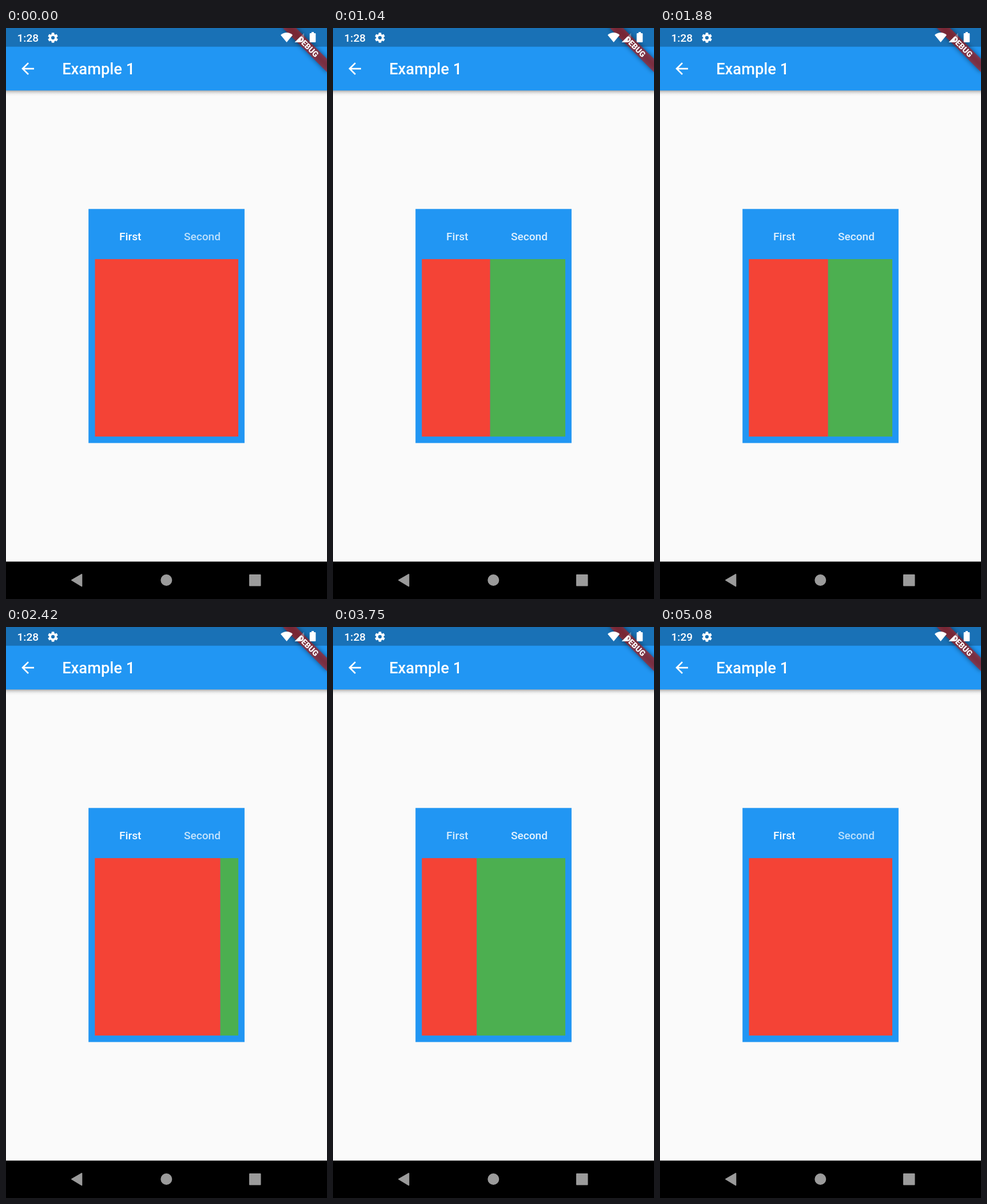
Recreate the animation shown at these times as an HTML page. Size 561 by 998 pixels, loop 5120 ms.

```html
<!DOCTYPE html>
<html lang="en">
<head>
<meta charset="utf-8">
<title>Tab swipe</title>
<style>
  html, body { margin: 0; width: 100%; height: 100%; overflow: hidden; background: #fafafa; }
  svg { display: block; width: 100%; height: 100%; }
  text { font-family: Roboto, "Noto Sans", sans-serif; font-weight: 500; fill: #fff; }
  .tab { font-size: 19.1px; text-anchor: middle; }
</style>
</head>
<body>
<svg viewBox="0 0 561 998">
  <defs>
    <linearGradient id="barShadow" x2="0" y2="1">
      <stop offset="0" stop-opacity=".32"/>
      <stop offset=".3" stop-opacity=".15"/>
      <stop offset=".65" stop-opacity=".04"/>
      <stop offset="1" stop-opacity="0"/>
    </linearGradient>
    <filter id="blur" x="-20%" y="-100%" width="140%" height="300%">
      <feGaussianBlur stdDeviation="4"/>
    </filter>
    <clipPath id="pageClip"><rect x="155.3" y="403.8" width="250.7" height="310.5"/></clipPath>
  </defs>

  <rect width="561" height="998" fill="#fafafa"/>
  <rect y="109" width="561" height="10" fill="url(#barShadow)"/>
  <rect width="561" height="109.2" fill="#2196f3"/>
  <rect width="561" height="32.7" fill-opacity=".25"/>
  <path transform="translate(21.7 54.7) scale(1.364)" fill="#fff"
    d="M20 11H7.83l5.59-5.59L12 4l-8 8 8 8 1.41-1.41L7.83 13H20z"/>
  <text x="98.2" y="81" font-size="27.3">Example 1</text>

  <rect x="144.2" y="316.3" width="272.7" height="409.1" fill="#2196f3"/>
  <text id="first" class="tab" x="217.2" y="370.5">First</text>
  <text id="second" class="tab" x="343" y="370.5">Second</text>
  <g clip-path="url(#pageClip)">
    <g id="pages">
      <rect x="155.3" y="403.8" width="250.7" height="310.5" fill="#f44336"/>
      <rect x="406" y="403.8" width="250.7" height="310.5" fill="#4caf50"/>
    </g>
  </g>

  <!-- debug ribbon -->
  <g transform="translate(561 0) rotate(45)">
    <rect x="-54.6" y="38.2" width="109.2" height="16.4" fill-opacity=".5" filter="url(#blur)"/>
    <rect x="-54.6" y="38.2" width="109.2" height="16.4" fill="#b71c1c" fill-opacity=".627"/>
    <text y="51.4" font-size="13.9" text-anchor="middle" style="font-weight:900">DEBUG</text>
  </g>

  <!-- status bar -->
  <text id="clock" x="19.5" y="24" font-size="19.1">1:28</text>
  <g fill="#fff">
    <path transform="translate(71.4 6.4) scale(.885)" d="M19.43 12.98c.04-.32.07-.64.07-.98s-.03-.66-.07-.98l2.11-1.65c.19-.15.24-.42.12-.64l-2-3.46c-.12-.22-.39-.3-.61-.22l-2.49 1c-.52-.4-1.08-.73-1.69-.98l-.38-2.65C14.46 2.18 14.25 2 14 2h-4c-.25 0-.46.18-.49.42l-.38 2.65c-.61.25-1.17.59-1.69.98l-2.49-1c-.23-.09-.49 0-.61.22l-2 3.46c-.13.22-.07.49.12.64l2.11 1.65c-.04.32-.07.65-.07.98s.03.66.07.98l-2.11 1.65c-.19.15-.24.42-.12.64l2 3.46c.12.22.39.3.61.22l2.49-1c.52.4 1.08.73 1.69.98l.38 2.65c.03.24.24.42.49.42h4c.25 0 .46-.18.49-.42l.38-2.65c.61-.25 1.17-.59 1.69-.98l2.49 1c.23.09.49 0 .61-.22l2-3.46c.12-.22.07-.49-.12-.64l-2.11-1.65zM12 15.5a3.5 3.5 0 1 1 0-7 3.5 3.5 0 0 1 0 7z"/>
    <path d="M480 12.2Q490.5 4 501 12.2L490.5 25z"/>
    <path d="M504.5 25L521 8.5V25z" fill-opacity=".3"/>
    <path d="M504.5 25L515 14.5V25z"/>
    <path d="M534 7h4v2h2q1.300 0 1.300 1.300V23.700q0 1.300-1.300 1.300h-8q-1.300 0-1.300-1.300V10.300q0-1.300 1.300-1.300h2z"/>
  </g>

  <!-- navigation bar -->
  <rect y="932.6" width="561" height="65.4"/>
  <g fill="#9b9b9b" stroke="#9b9b9b" stroke-linejoin="round" stroke-width="2">
    <path d="M115 965L132.300 955V975.500z"/>
    <circle cx="280.300" cy="965" r="9"/>
    <rect x="426" y="956" width="18.500" height="18.500"/>
  </g>
</svg>
<script>
  const LOOP = 5120, PAGE = 250.7, CLOCK_TICK = 4400;
  // Each swipe moves the pages by one step, alternately forward and back.
  const swipes = [
    { start: 680, length: 700, step: 1 },
    { start: 1560, length: 600, step: -1 },
    { start: 2242, length: 810, step: 1 },
    { start: 3456, length: 700, step: -1 }
  ];
  const [pages, first, second, clock] =
    ["pages", "first", "second", "clock"].map(id => document.getElementById(id));

  const ease = x => {
    const p = Math.min(1, Math.max(0, x));
    return p * p * (3 - 2 * p);
  };

  function draw(t) {
    const offset = swipes.reduce((sum, s) => sum + s.step * ease((t - s.start) / s.length), 0);
    pages.setAttribute("transform", `translate(${-PAGE * offset} 0)`);
    first.setAttribute("fill-opacity", 1 - 0.3 * offset);
    second.setAttribute("fill-opacity", 0.7 + 0.3 * offset);
    clock.textContent = t < CLOCK_TICK ? "1:28" : "1:29";
  }

  const origin = performance.now();
  function tick() {
    draw((performance.now() - origin) % LOOP);
    requestAnimationFrame(tick);
  }
  tick();
</script>
</body>
</html>
```
